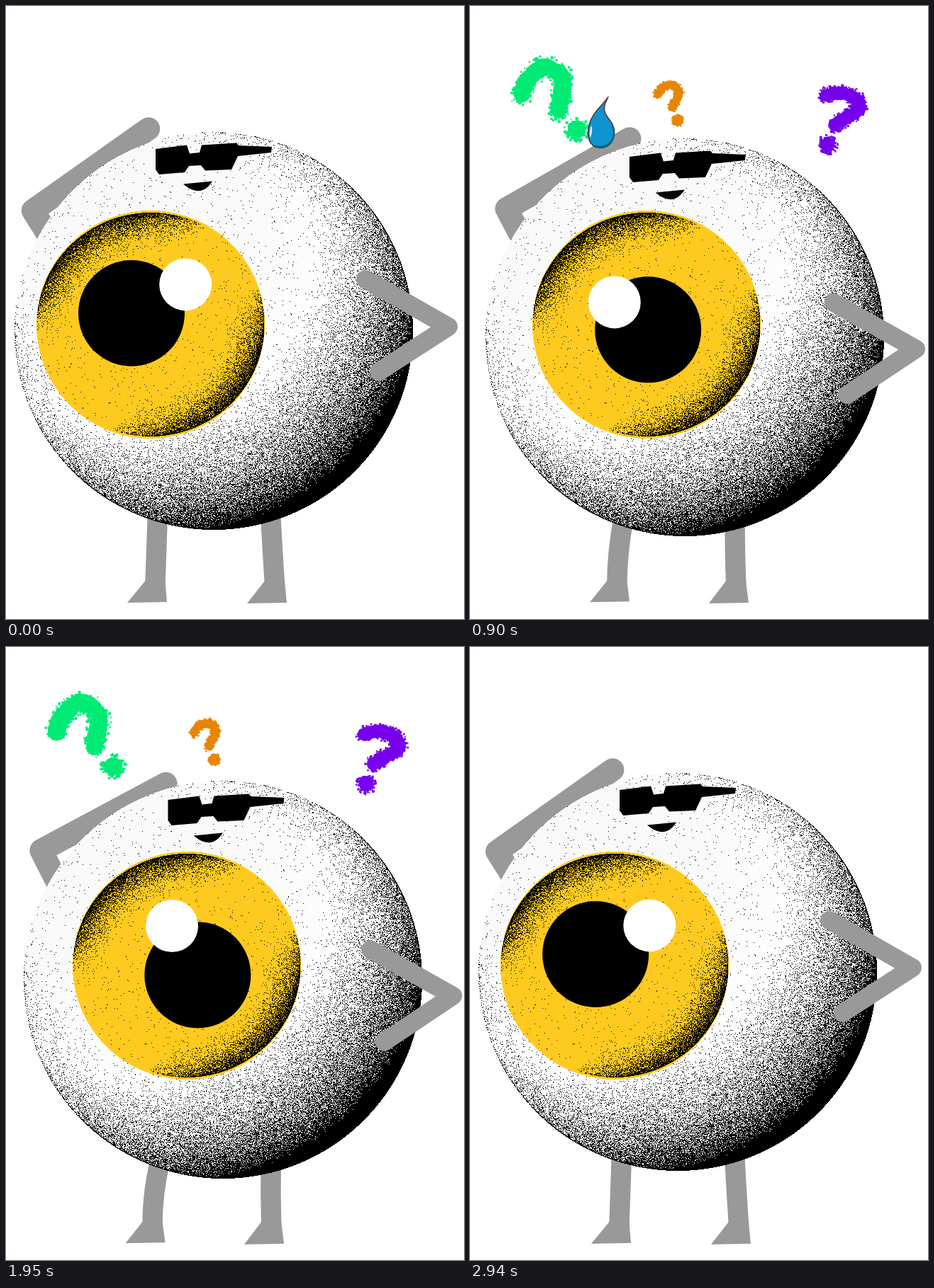
Recreate the animation shown at these times as an HTML page with a canvas. Size 646 by 866 pixels, loop 2970 ms.

```html
<!DOCTYPE html>
<html lang="en">
<head>
<meta charset="utf-8">
<title>Puzzled eyeball</title>
<style>
html, body { margin: 0; width: 100%; height: 100%; overflow: hidden; background: #fff; }
canvas { display: block; }
</style>
</head>
<body>
<canvas id="stage" width="646" height="866"></canvas>
<script>
const LOOP = 2970, STEP = 30, GREY = '#999';
const ctx = document.getElementById('stage').getContext('2d');

const clamp = v => Math.max(0, Math.min(1, v));
const smooth = v => { v = clamp(v); return v * v * (3 - 2 * v); };
const mix = (a, b, k) => a + (b - a) * k;

// Rise from 0 to 1 at the peak, then back to 0 at the end
const swing = (t, peak, end) =>
  smooth(t < peak ? t / peak : (end - t) / (end - peak));

function random(seed) {
  return () => {
    seed = (seed + 0x6D2B79F5) | 0;
    let n = Math.imul(seed ^ (seed >>> 15), 1 | seed);
    n = (n + Math.imul(n ^ (n >>> 7), 61 | n)) ^ n;
    return ((n ^ (n >>> 14)) >>> 0) / 4294967296;
  };
}

// Disc painted pixel by pixel; shade(x, y, s, rnd) returns [r, g, b]
function makeDisc(r, seed, shade) {
  const c = document.createElement('canvas');
  const size = c.width = c.height = Math.ceil(r * 2);
  const g = c.getContext('2d');
  const img = g.createImageData(size, size);
  const rnd = random(seed);
  for (let j = 0; j < size; j++) {
    for (let i = 0; i < size; i++) {
      const x = i + 0.5 - r, y = j + 0.5 - r, s = Math.hypot(x, y) / r;
      if (s > 1) continue;
      const [cr, cg, cb] = shade(x, y, s, rnd);
      const k = (j * size + i) * 4;
      img.data[k] = cr;
      img.data[k + 1] = cg;
      img.data[k + 2] = cb;
      img.data[k + 3] = 255;
    }
  }
  g.putImageData(img, 0, 0);
  return c;
}

const BLACK = [0, 0, 0], WHITE = [255, 255, 255];
const PALE = [249, 249, 249], YELLOW = [255, 202, 32];

const ball = makeDisc(281, 7, (x, y, s, rnd) => {
  const d = Math.hypot(x + 120, y + 130);
  const dark = 0.008 + clamp((d - 252) / 196) ** 1.9
    + (0.2 * s ** 10 + (s > 0.995 ? 0.5 : 0)) * clamp((d - 150) / 200);
  if (rnd() < dark) return BLACK;
  return rnd() < clamp((d - 150) / 160) ? WHITE : PALE;
});

const iris = makeDisc(161, 21, (x, y, s, rnd) => {
  const e = Math.hypot(x / 160.5, y / 158);
  if (e > 1) return YELLOW;
  const top = clamp(((-0.53 * x - 0.848 * y) / 161 - 0.45) / 0.4);
  const low = clamp(((x + y) * 0.707 / 161 - 0.4) / 0.45);
  const rim = clamp((s - 0.6) / 0.4) ** 1.8 + (e > 0.991 ? 0.6 : 0);
  return rnd() < 0.01 + rim * Math.max(top, low) ? BLACK : YELLOW;
});

function disc(x, y, r, color) {
  ctx.fillStyle = color;
  ctx.beginPath();
  ctx.arc(x, y, r, 0, Math.PI * 2);
  ctx.fill();
}

function poly(points, color) {
  ctx.fillStyle = color;
  ctx.beginPath();
  points.forEach(p => ctx.lineTo(p[0], p[1]));
  ctx.closePath();
  ctx.fill();
}

function limb(points, width) {
  ctx.strokeStyle = GREY;
  ctx.lineWidth = width;
  ctx.lineCap = ctx.lineJoin = 'round';
  ctx.beginPath();
  points.forEach(p => ctx.lineTo(p[0], p[1]));
  ctx.stroke();
}

function leg(x0, y0, cx, x1, footX, footY) {
  ctx.strokeStyle = GREY;
  ctx.lineWidth = 28.5;
  ctx.lineCap = 'butt';
  ctx.beginPath();
  ctx.moveTo(x0, y0);
  ctx.quadraticCurveTo(cx, 772, x1, 816);
  ctx.stroke();
  poly([[x1 - 14, 812], [x1 + 14, 812], [footX + 56, footY], [footX, footY + 1]], GREY);
}

// Glyph points are relative to the centre; each grows out of its home point
const marks = [
  { color: '#00eb76', w: 30, at: [114, 98], home: [122, 421], dot: [40, 47, 16],
    line: [[-47, -7], [-40, -28], [-12, -52], [16, -37], [16, -8], [11, 18]] },
  { color: '#e88504', w: 13, at: [285, 121], home: [242, 278], dot: [14, 27, 8],
    line: [[-18, -14], [-10, -25], [6, -29], [16, -18], [10, -3], [5, 7]] },
  { color: '#7600ea', w: 23, at: [547, 147], home: [336, 278], dot: [-22, 39, 13],
    line: [[-27, -38], [-2, -43], [23, -32], [26, -16], [4, -2], [-12, 8]] }
];

// Evenly stepped points on a spline through the given ones
function spline(pts, steps) {
  const out = [], at = i => pts[Math.max(0, Math.min(pts.length - 1, i))];
  for (let i = 0; i < pts.length - 1; i++) {
    const [a, b, c, d] = [at(i - 1), at(i), at(i + 1), at(i + 2)];
    for (let n = 0; n <= steps; n++) {
      const u = n / steps;
      out.push([0, 1].map(k => b[k] + 0.5 * u * (c[k] - a[k]
        + u * (2 * a[k] - 5 * b[k] + 4 * c[k] - d[k]
        + u * (3 * (b[k] - c[k]) + d[k] - a[k])))));
    }
  }
  return out;
}
marks.forEach(m => { m.curve = spline(m.line, 9); });

function roughDisc(x, y, r, count, rnd) {
  disc(x, y, r * (0.72 + 0.22 * rnd()), ctx.fillStyle);
  for (let i = 0; i < count; i++) {
    const a = rnd() * Math.PI * 2, d = r * (0.75 + 0.5 * rnd() ** 2);
    const size = 1 + r * 0.08 * rnd();
    ctx.fillRect(x + Math.cos(a) * d - size, y + Math.sin(a) * d - size, size * 2, size * 2);
  }
}

function drawMark(m, q, rnd) {
  ctx.save();
  ctx.translate(mix(m.home[0], m.at[0], q), mix(m.home[1], m.at[1], q));
  ctx.scale(q, q);
  ctx.fillStyle = m.color;
  m.curve.forEach(p => roughDisc(p[0], p[1], m.w / 2, 9, rnd));
  roughDisc(m.dot[0], m.dot[1], m.dot[2], 90, rnd);
  ctx.restore();
}

function markGrowth(t) {
  if (t < 1470) return 1 - (1 - clamp((t - 284) / 1171)) ** 3;
  return 1 - clamp((t - 1485) / 1052) ** 3;
}

function drawDrop(t) {
  const alpha = Math.min(clamp((t - 420) / 150), clamp((1355 - t) / 240));
  if (alpha <= 0) return;
  const fall = Math.max(0, (t - 540) / 660);
  ctx.save();
  ctx.globalAlpha = alpha;
  ctx.translate(0, 102 * fall * fall - 2);
  ctx.beginPath();
  ctx.moveTo(195, 100);
  ctx.bezierCurveTo(185, 118, 190, 124, 198, 134);
  ctx.bezierCurveTo(210, 150, 202, 173, 182, 172);
  ctx.bezierCurveTo(168, 171, 164, 155, 168, 140);
  ctx.bezierCurveTo(172, 124, 181, 118, 195, 100);
  ctx.fillStyle = '#0f93cf';
  ctx.fill();
  const edge = ctx.createLinearGradient(0, 100, 0, 172);
  edge.addColorStop(0, '#7a2a1c');
  edge.addColorStop(0.6, '#40342f');
  edge.addColorStop(1, '#0d3c55');
  ctx.strokeStyle = edge;
  ctx.lineWidth = 1.5;
  ctx.stroke();
  ctx.clip();
  ctx.strokeStyle = '#0b6996';
  ctx.lineWidth = 4;
  ctx.beginPath();
  ctx.arc(184, 151, 20, -0.5, 1.9);
  ctx.stroke();
  ctx.fillStyle = '#d9f1fb';
  ctx.beginPath();
  ctx.ellipse(170.5, 149, 1.5, 8, 0.1, 0, Math.PI * 2);
  ctx.fill();
  ctx.restore();
}

const shades = [
  [211, 202], [255, 196.5], [259, 208.5], [273, 207], [276, 196.5], [325, 193.5],
  [328, 197], [375, 199], [374, 207], [327, 212], [318, 231], [281, 232.5],
  [275, 225], [258, 226], [252, 235], [216, 238], [211, 231]
];

function drawFace(p) {
  const gx = 22 * p, gy = 17.5 * p;
  poly(shades.map(([x, y]) => [x + gx, y + gy]), '#000');
  const x = 250 + 18.5 * p, y = 251.5 + 19 * p;
  ctx.beginPath();
  ctx.moveTo(x, y);
  ctx.lineTo(x + 41, y - 4);
  ctx.bezierCurveTo(x + 31, y + 13, x + 16, y + 14, x, y);
  ctx.fill();
}

function drawIris(t, p) {
  let k = swing(t, 1485, LOOP);
  if (t > 1485) k -= 0.047 * Math.sin(Math.PI * (LOOP - t) / 1485) ** 4;
  const cx = 204 + 68.5 * k, cy = 450;
  ctx.drawImage(iris, Math.round(cx - 161), cy - 161);
  disc(177 + 117.5 * p, 434 + 37 * p, 75, '#000');
  const q = swing(t, 1290, 2610);
  const angle = mix(41, -82, q) * Math.PI / 180;
  const r = 65 + 10 * Math.cos(Math.PI * 1.35 * q);
  disc(cx + r * Math.sin(angle), cy - r * Math.cos(angle), 37, '#fff');
}

function draw(t) {
  const p = swing(t, 1530, LOOP);
  ctx.fillStyle = '#fff';
  ctx.fillRect(0, 0, 646, 866);

  const q = markGrowth(t), rnd = random(t + 1);
  if (q > 0.45) marks.forEach(m => drawMark(m, q, rnd));

  leg(214 + 4 * p, 715 + 15 * p, 212 - 7 * p, 210.5 - 5 * p, 171 - 3 * p, 842 - p);
  leg(373 + p, 715 + 15 * p, 376 - 4 * p, 379 - 6 * p, 340 - 5 * p, 843);

  const ex = 38 + 48 * p - 42 * p * p, ey = 289 - 12 * p + 12.5 * p * p;
  limb([
    [201 + 68 * p - 47 * p * p, 173.5 + 13 * p + 14.5 * p * p],
    [ex, ey],
    [ex + 44 - 6 * p, ey + 70 + 10 * p]
  ], 32.5);

  ctx.drawImage(ball, Math.round(11.5 + 16.7 * p), Math.round(178 + 13.8 * p));
  drawFace(p);
  drawIris(t, p);
  limb([
    [507 + 9 * p, 386 + 52 * p],
    [624 + 8 * p, 453 + 50 * p],
    [526 + 9.5 * p, 516.5 + 52 * p]
  ], 26);
  drawDrop(t);
}

const start = performance.now();
let shown = -1;
function tick() {
  const t = Math.floor(((performance.now() - start) % LOOP) / STEP) * STEP;
  if (t !== shown) draw(shown = t);
  requestAnimationFrame(tick);
}
tick();
</script>
</body>
</html>
```
